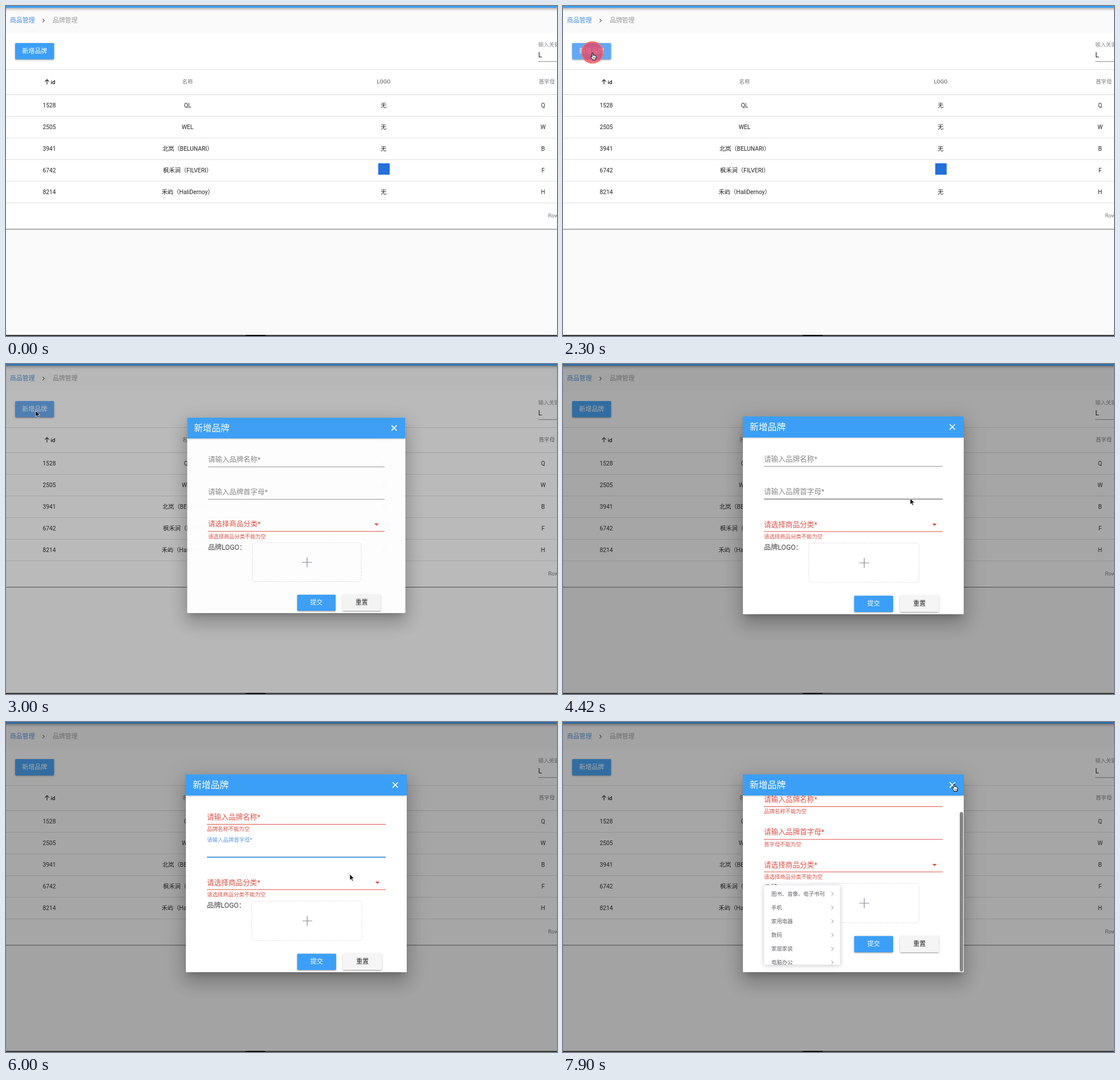
Animation of 968 by 579 pixels, one loop 8 s. Source, as an HTML page:

```html
<!DOCTYPE html>
<html lang="zh-CN">
<head>
<meta charset="utf-8">
<title>品牌管理</title>
<style>
html, body { margin: 0; width: 100%; height: 100%; overflow: hidden; background: #fafafa; }
svg { display: block; width: 968px; height: 579px; font-family: Roboto, 'Noto Sans CJK SC', 'Noto Sans CJK', sans-serif; }
</style>
</head>
<body>
<svg id="stage" viewBox="0 0 968 579" xmlns="http://www.w3.org/2000/svg"></svg>
<script>
const BLUE = '#3c9ff7', RED = '#dd5146', GREY = '#8a8a8a', INK = '#222';
const LEFT = 353, RIGHT = 667, MID = 510;
const stage = document.getElementById('stage');
const $ = id => document.getElementById(id);
const set = (id, attrs) => { for (const k in attrs) $(id).setAttribute(k, attrs[k]); };

// Markup helpers; text is placed by its vertical centre
const text = (x, y, size, str, fill = INK, extra = '') =>
  `<text x="${x}" y="${y + size * 0.365}" font-size="${size}" fill="${fill}" ${extra}>${str}</text>`;
const centred = (x, y, size, str, fill, extra = '') =>
  text(x, y, size, str, fill, 'text-anchor="middle" ' + extra);
const rect = (x, y, w, h, fill, extra = '') =>
  `<rect x="${x}" y="${y}" width="${w}" height="${h}" fill="${fill}" ${extra}/>`;
const path = (d, stroke, width, extra = '') =>
  `<path d="${d}" fill="none" stroke="${stroke}" stroke-width="${width}" ${extra}/>`;
const shadow = (x, y, w, h, dy, blur, spread, alpha) =>
  rect(x - spread, y - spread + dy, w + 2 * spread, h + 2 * spread, '#000',
    `opacity="${alpha}" style="filter:blur(${blur / 2}px)"`);
const button = (x, y, label, fill, ink, id) =>
  shadow(x, y, 68.5, 28.5, 2.4, 0.8, -1.6, 0.2) + shadow(x, y, 68.5, 28.5, 1.6, 1.6, 0, 0.14) +
  shadow(x, y, 68.5, 28.5, 0.8, 4, 0, 0.12) +
  rect(x, y, 68.5, 28.5, fill, `rx="1.6" id="${id}"`) +
  centred(x + 34.2, y + 13.8, 11, label, ink, 'font-weight="500"');

const rows = [
  ['1528', 'QL', 'Q'],
  ['2505', 'WEL', 'W'],
  ['3941', '北岚（BELUNARI）', 'B'],
  ['6742', '枫禾涧（FILVERI）', 'F'],
  ['8214', '禾屿（HaliDernoy）', 'H']
];

function page() {
  let s = rect(0, 0, 968, 579, '#fafafa') + rect(0, 48, 968, 343, '#fff') +
    shadow(-10, -10, 988, 13, 1.6, 3.2, -0.8, 0.2) + shadow(-10, -10, 988, 13, 3.2, 4, 0, 0.14) +
    shadow(-10, -10, 988, 13, 0.8, 8, 0, 0.12) + rect(0, 0, 967, 3, BLUE) +
    text(7, 25, 10.9, '商品管理', '#4a90dc') +
    path('M64.4 22.6l2.9 3-2.9 3', '#555', 1.1) +
    text(82, 25, 10.9, '品牌管理', '#9c9c9c') +
    button(16, 65, '新增品牌', BLUE, '#fff', 'add') +
    text(935, 68, 9.4, '输入关键字搜索', GREY) + text(935, 85, 12.6, 'L') +
    rect(935, 97, 33, 1, '#8f8f8f') +
    path('M72 137.6V129M68.4 132.6L72 129L75.6 132.6', INK, 1.2) +
    text(78.6, 133, 9.8, 'id', '#111', 'font-weight="500"');
  [[319, '名称'], [663.5, 'LOGO'], [950, '首字母']].forEach(([x, h]) =>
    s += centred(x, 133, 9.4, h, '#757575', 'font-weight="500"'));
  s += rect(0, 111, 968, 1, '#dfdfdf') + rect(0, 155, 968, 1, '#d4d4d4');
  rows.forEach(([id, name, letter], i) => {
    const y = 174 + 38 * i;
    s += centred(76, y, 10.3, id) + centred(319, y, 10.3, name) + centred(943.5, y, 10.3, letter) +
      (i === 3 ? rect(654, y - 12, 20, 20, '#2470dc') : centred(663.5, y, 10.3, '无')) +
      rect(0, y + 19, 968, 1, '#dfdfdf');
  });
  return s + text(952.5, 368, 9.4, 'Rows per page:', '#757575') +
    rect(0, 391, 968, 1, '#777') + rect(0, 392, 968, 1, '#000', 'opacity=".07"');
}

const field = (id, y, label, error) =>
  `<g id="${id}Label">${text(0, 0, 12.6, label, 'inherit')}</g>` +
  rect(LEFT, y, RIGHT - LEFT, 1, '#949494', `id="${id}Line"`) +
  rect(LEFT, y, 0, 1.7, '#3b97e6', `id="${id}Focus"`) +
  `<g id="${id}Error">${text(LEFT, y + 9, 9.4, error, RED)}</g>`;

function menu() {
  const items = ['图书、音像、电子书刊', '手机', '家用电器', '数码', '家居家装', '电脑办公'];
  return `<g id="menu">` + shadow(LEFT, 317, 134, 140, 1.5, 9, 0, 0.2) +
    rect(LEFT, 317, 134, 140, '#fff', 'rx="2" stroke="#e4e7ed" stroke-width=".8"') +
    '<g clip-path="url(#menuClip)">' + items.map((item, i) => {
      const y = 332.5 + 24.1 * i;
      return text(366, y, 9.4, item, '#606266') +
        path(`M471.6 ${y - 3.2}l3.3 3.2-3.3 3.2`, '#777', 0.9);
    }).join('') + '</g></g>';
}

function dialog() {
  const box = [316, 92, 388, 347];
  return '<g id="dialog">' +
    shadow(...box, 8.7, 12, -5.5, 0.2) + shadow(...box, 19, 30, 2.4, 0.14) + shadow(...box, 7, 36, 6.3, 0.12) +
    rect(...box, '#fff', 'rx="1.6"') +
    '<g clip-path="url(#bodyClip)"><g id="form">' +
    field('name', 179, '请输入品牌名称*', '品牌名称不能为空') +
    field('letter', 236.5, '请输入品牌首字母*', '首字母不能为空') +
    text(LEFT, 281, 12.6, '请选择商品分类*', RED) + rect(LEFT, 293.5, RIGHT - LEFT, 1, RED) +
    `<path d="M648.6 280h8l-4 4z" fill="${RED}"/>` +
    text(LEFT, 303, 9.4, '请选择商品分类不能为空', RED) +
    text(LEFT, 322, 12.2, '品牌LOGO：', '#444') +
    rect(431.8, 314.2, 193.7, 69, 'none', 'rx="4.5" stroke="#d9d9d9" stroke-width=".9" stroke-dasharray="2.4 1.6"') +
    path('M520.5 349h17.4M529.2 340.3v17.4', '#858a92', 1.2) +
    button(511.5, 406.5, '提交', BLUE, '#fff', 'submit') +
    button(592, 406.5, '重置', '#f5f5f5', INK, 'reset') + menu() + '</g>' +
    rect(697, 158, 6, 280, '#858585', 'rx="3" id="bar"') + '</g>' +
    shadow(316, 92, 388, 37, 1.5, 3, -1, 0.3) + rect(316, 92, 388, 37, BLUE) +
    text(328, 110, 15.8, '新增品牌', '#fff', 'font-weight="500"') +
    path('M679.2 105.7l9.4 9.4M688.6 105.7l-9.4 9.4', '#fff', 1.6) + '</g>';
}

stage.innerHTML =
  '<defs><clipPath id="bodyClip"><rect x="316" y="129" width="388" height="310"/></clipPath>' +
  '<clipPath id="menuClip"><rect x="353" y="317" width="134" height="140"/></clipPath></defs>' +
  page() + rect(0, 0, 968, 577, '#212121', 'id="shade"') + dialog() +
  rect(0, 577, 968, 2, '#3a3a3a') + rect(421, 577, 35, 2, '#000') +
  '<circle id="ring" fill="#ef4060" fill-opacity=".74" stroke="#f0806a" stroke-opacity=".9" stroke-width="1.8"/>' +
  '<g id="cursor" stroke-linejoin="round">' +
  '<path id="arrow" d="M0 0V10.4L2.4 8.2L4.1 12L5.8 11.2L4.1 7.5H7.3Z" fill="#000" stroke="#fff" stroke-width=".7"/>' +
  '<g id="hand"><path d="M-1 .8Q0-.6 1 .8V4.6L2.6 4.4L4.2 5L5.6 5.6Q6.6 6 6.3 8L5.4 11V12.6H-.4V11.3L-3.4 7.6Q-3.9 6.2-2.6 6.2L-1 7.5Z" fill="#fff" stroke="#000" stroke-width="1"/>' +
  '<path d="M1.2 8v2.4M2.8 8v2.4M4.3 8v2.4" stroke="#000" stroke-width=".6"/></g>' +
  '<path id="beam" d="M-2-6Q0-6 0-5Q0-6 2-6M0-5V5M-2 6Q0 6 0 5Q0 6 2 6" fill="none" stroke="#222" stroke-width="1"/></g>';

// Timing helpers
const clamp = v => Math.min(1, Math.max(0, v));
const span = (t, from, length) => clamp((t - from) / length);
const smooth = p => p * p * (3 - 2 * p);
const mix = (a, b, p) => a + (b - a) * p;

// Cubic bezier (.25, .8, .25, 1)
function swift(p) {
  let lo = 0, hi = 1;
  for (let i = 0; i < 24; i++) {
    const s = (lo + hi) / 2, r = 1 - s;
    if (0.75 * r * s + s * s * s < p) lo = s; else hi = s;
  }
  const s = (lo + hi) / 2, r = 1 - s;
  return 2.4 * r * r * s + 3 * r * s * s + s * s * s;
}

// Pointer stops: time, x, y
const stops = [
  [400, 154, 362], [500, 176, 145], [660, 176, 145], [1000, 52, 82], [1080, 52, 82],
  [1360, 640, 226], [1440, 655, 208], [1480, 655, 208], [1780, 52, 82], [3140, 52, 82],
  [3460, 560, 368], [3720, 560, 368], [4060, 520, 134], [4420, 610, 236], [4520, 608, 224],
  [4560, 608, 224], [4760, 600, 170], [5360, 600, 170], [5440, 598, 226], [5800, 598, 226],
  [6000, 604, 267], [6220, 604, 267], [6300, 600, 264], [7300, 600, 264], [7600, 694, 107],
  [7800, 694, 107], [7890, 687, 109]
];
const clicks = [[2300, 51.5, 81.5], [4800, 600, 170], [5440, 598, 226], [6300, 600, 264]];

function pointer(t) {
  let i = 0;
  while (i < stops.length - 1 && stops[i + 1][0] <= t) i++;
  const a = stops[i], b = stops[i + 1] || a;
  const p = a === b ? 0 : smooth(span(t, a[0], b[0] - a[0]));
  return [mix(a[1], b[1], p), mix(a[2], b[2], p)];
}

function drawField(id, y, t, focusAt, blurAt, hover) {
  const lift = t < blurAt ? swift(span(t, focusAt, 300)) : 1 - swift(span(t, blurAt, 300));
  const focused = t >= focusAt && t < blurAt, failed = t >= blurAt;
  const width = focused ? (RIGHT - LEFT) * lift : 0;
  set(id + 'Label', {
    transform: `translate(${LEFT} ${y - 13 - 16.5 * lift}) scale(${1 - 0.25 * lift})`,
    fill: failed ? RED : focused ? '#5a9ae2' : GREY
  });
  set(id + 'Line', { fill: failed ? RED : hover ? '#444' : '#949494' });
  set(id + 'Focus', { x: MID - width / 2, width });
  set(id + 'Error', { opacity: span(t, blurAt, 200) });
}

function draw(t) {
  const [x, y] = pointer(t);
  const opened = t >= 2900;
  const overAdd = !opened && t >= 400 && x > 16 && x < 85 && y > 65 && y < 94;
  const overClose = t >= 7840;
  const inForm = t >= 3140 && x > LEFT && x < RIGHT;
  const over = line => inForm && y > line - 32 && y < line + 12;

  set('add', { fill: overAdd || (opened && t < 3200) ? '#62a9f5' : BLUE });
  set('shade', { opacity: 0.4 * span(t, 2690, 400) });

  const p = swift(span(t, 2787, 330)), k = 0.5 + p / 2;
  set('dialog', {
    opacity: p,
    transform: `translate(${MID} 265.5) scale(${k}) translate(${-MID} -265.5)`
  });
  drawField('name', 179, t, 4840, 5480, over(179));
  drawField('letter', 236.5, t, 5480, 6340, over(236.5));

  const drop = swift(span(t, 7300, 280));
  set('form', { transform: `translate(0 ${-31 * drop})` });
  set('menu', { opacity: drop });
  set('bar', { opacity: drop });

  const hit = clicks.find(c => t >= c[0] && t < c[0] + 550);
  set('ring', hit ? { cx: hit[1], cy: hit[2], r: 19 * (1 - span(t, hit[0], 550)) } : { r: 0 });
  $('ring').style.display = hit ? '' : 'none';

  const beam = inForm && ((y > 150 && y < 180) || (y > 207 && y < 235));
  const kind = overAdd || overClose ? 'hand' : beam ? 'beam' : 'arrow';
  ['arrow', 'hand', 'beam'].forEach(id => $(id).style.display = id === kind ? '' : 'none');
  set('cursor', { transform: `translate(${x} ${y})`, opacity: t < 400 ? 0 : 1 });
}

const start = performance.now();
function tick() {
  draw((performance.now() - start) % 8000);
  requestAnimationFrame(tick);
}
draw(0);
tick();
</script>
</body>
</html>
```
